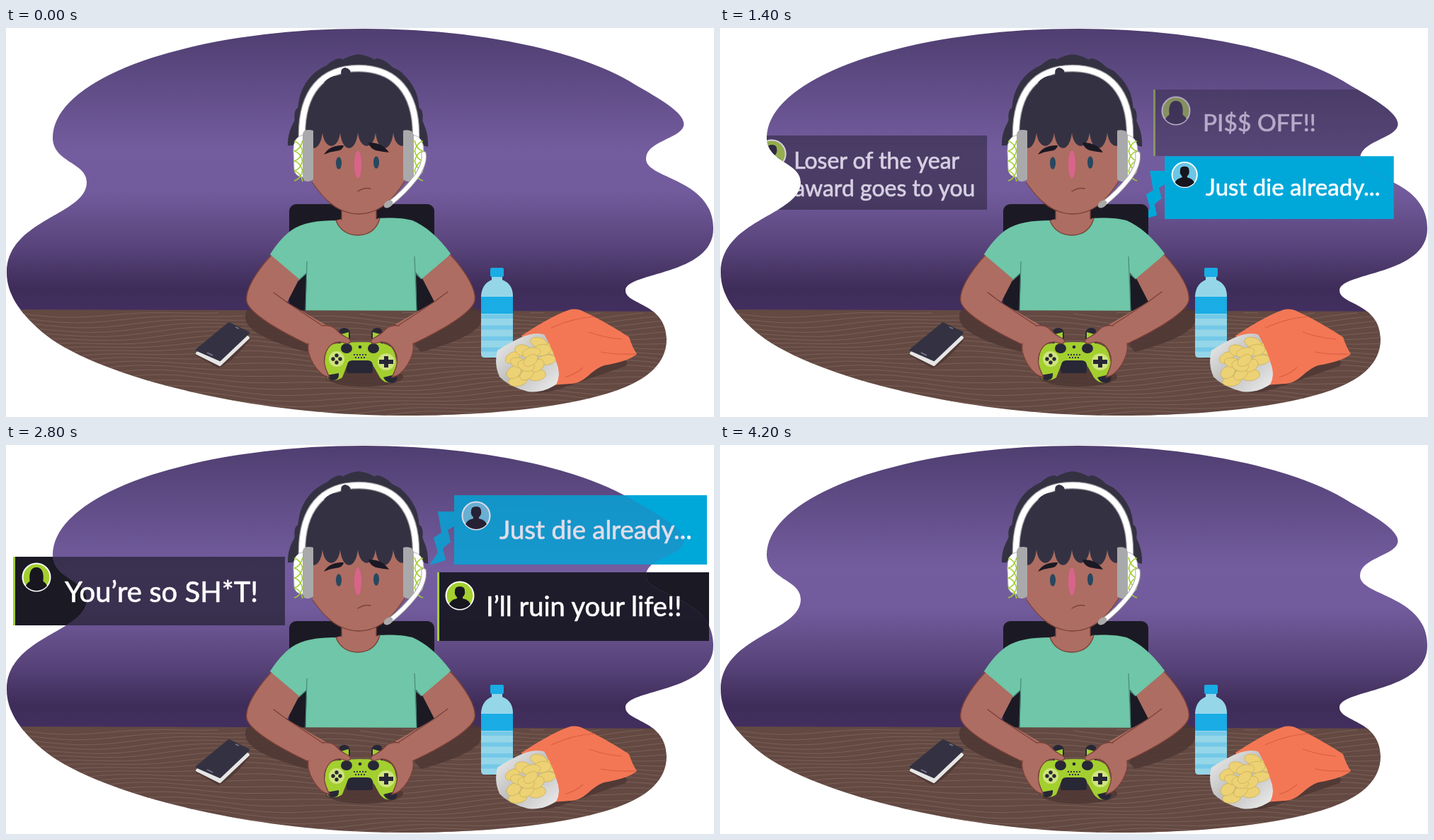
Recreate the animation shown at these times as an HTML page. Size 1000 by 550 pixels, loop 4300 ms.

```html
<!DOCTYPE html>
<html lang="en">
<head>
<meta charset="utf-8">
<title>Online bullying</title>
<style>
html, body { margin: 0; width: 100%; height: 100%; overflow: hidden; background: #fff; }
svg { display: block; width: 100%; height: 100%; }
text { font-family: Lato, "Open Sans", sans-serif; fill: #fff; stroke: #fff; stroke-width: .7; stroke-linejoin: round; }
.skin { fill: #ad6d62; }
.line { fill: none; stroke: #7b4038; stroke-width: 1.3; stroke-linecap: round; }
.hair { fill: #343242; }
.dark { fill: #282736; }
.lime { fill: #a3cf2f; }
.wire { fill: none; stroke-linecap: round; }
</style>
</head>
<body>
<svg viewBox="0 0 1000 550" xmlns="http://www.w3.org/2000/svg">
<defs>
  <linearGradient id="wallFill" gradientUnits="userSpaceOnUse" x1="0" y1="0" x2="0" y2="400">
    <stop offset="0" stop-color="#4f3e70"/><stop offset=".2" stop-color="#604c86"/>
    <stop offset=".44" stop-color="#745d9f"/><stop offset=".58" stop-color="#725b9c"/>
    <stop offset=".78" stop-color="#574379"/><stop offset=".92" stop-color="#3e2c59"/>
    <stop offset="1" stop-color="#422f5f"/>
  </linearGradient>
  <linearGradient id="foil" x1="0" y1="0" x2="1" y2="1">
    <stop offset="0" stop-color="#f2f2f2"/><stop offset=".5" stop-color="#bdbdbd"/><stop offset="1" stop-color="#f0f0f0"/>
  </linearGradient>
  <clipPath id="inBlob"><path d="M66 155A439 154 0 0 1 890 81C925 101 962 122 957 139C951 157 904 160 904 185C904 214 999 212 999 284C999 350 875 345 875 371C875 392 932 388 933 440C933 500 850 521 770 534C700 545 620 548 560 548C340 548 120 490 50 429C18 401 1 375 1 346C1 270 114 265 114 218C114 190 66 190 66 155Z"/></clipPath>
  <clipPath id="aboveDesk"><rect width="1000" height="400"/></clipPath>
  <path id="shade" d="M340 400C331 419 350 438 425 458L440 440L352 394Z"/>
  <g id="arm">
    <path class="skin" d="M374 321C353 345 337 371 340 387C344 403 383 427 428 448L452 420L397 388L414 355Z"/>
    <path class="line" d="M374 322C353 345 337 371 340 387C344 403 383 427 428 448M378 374L397 388L447 421"/>
  </g>
  <g id="hand">
    <path class="skin" d="M427 446C424 464 440 491 457 494C452 483 447 474 451 461C455 449 464 441 477 445C485 448 489 444 485 440C479 436 473 434 468 428C460 419 448 418 436 428Z"/>
    <path class="line" d="M427 446C424 464 440 491 457 494C452 483 447 474 451 461C455 449 464 441 477 445C485 448 489 444 485 440C479 436 473 434 468 428C462 421 455 420 447 421"/>
  </g>
  <g id="trigger">
    <path class="dark" d="M470 447V431Q471 423 479 424Q486 425 486 433V447Z"/>
    <path class="lime" d="M473 447V433L484 430V447Z"/>
  </g>
  <path id="band" d="M418 154C417 90 447 57 498 57C549 57 580 90 579 154"/>
  <path id="boom" d="M590 178Q592 192 579 211Q562 233 541 249"/>
</defs>

<g id="under" clip-path="url(#aboveDesk)"></g>
<g clip-path="url(#inBlob)">
  <rect width="1000" height="404" fill="url(#wallFill)"/>
  <g id="over"></g>
  <rect x="400" y="249" width="205" height="165" rx="10" fill="#1b1a24"/>

  <path fill="#6fc6a8" d="M467 272C440 272 419 275 403 286C391 295 381 307 373 320Q390 343 413 357L425 346L423 402H580L579 346L587 355Q610 343 628 319C612 297 593 280 574 272C560 268 540 268 526 269Q514 293 497 293Q478 293 467 272Z"/>
  <path d="M425 330L423 400M577 323L580 400M425 346L413 357M578 347L587 355" fill="none" stroke="#468b78" stroke-width="1.2"/>
  <path class="skin" d="M474 250V270L466 272C471 286 483 293 497 293C513 293 524 284 528 269L523 270V250Z"/>
  <path class="line" d="M466 272C471 286 483 293 497 293C513 293 524 284 528 269M474 259V271M523 259V270"/>

  <path d="M0 398L1000 401V550H0Z" fill="#634942"/>
  <path id="grain" fill="none" stroke="#7c6259" stroke-width=".9"/>
  <g fill="#4e3733" opacity=".85">
    <use href="#shade"/><use href="#shade" transform="translate(1011 0)scale(-1 1)"/>
    <ellipse cx="506" cy="493" rx="55" ry="14"/>
    <path d="M268 463L300 481Q320 472 345 440L335 430Z"/>
    <path d="M668 461Q690 474 720 462L700 495Q735 525 780 511L875 478Q884 468 850 460Z"/>
  </g>

  <g stroke-linejoin="round" stroke-width="4">
    <path d="M270 460L302 476L342 438L315 422Z" fill="#e6e6e6" stroke="#e6e6e6"/>
    <path d="M270 455L302 469L342 431L315 418Z" fill="#343242" stroke="#343242"/>
    <path d="M284 459L292 463M324 423L329 425" stroke="#77758a" stroke-width="1.7"/>
  </g>

  <use href="#arm"/><use href="#arm" transform="translate(1002 -1)scale(-1 1)"/>

  <use href="#trigger"/><use href="#trigger" transform="translate(1002 0)scale(-1 1)"/>
  <rect class="dark" x="481" y="466" width="37" height="22" rx="3"/>
  <path class="lime" d="M470 446Q500 442 532 446Q545 448 549 460C553 475 557 493 549 500Q536 505 528 494L518 476Q517 470 511 470H489Q483 470 482 476L475 494Q467 500 456 497C446 490 450 458 456 450Q462 446 470 446Z"/>
  <path class="dark" d="M453 491L470 488Q471 498 462 498Q455 499 453 491ZM533 494L553 489Q554 501 545 502Q537 502 533 494Z"/>
  <g fill="#cfe47f"><circle cx="467" cy="468" r="11"/><circle cx="537" cy="472" r="12"/></g>
  <g id="buttons" class="dark">
    <path d="M534 464H540V469H547V475H540V480H534V475H527V469H534Z"/>
    <ellipse cx="481" cy="453" rx="8" ry="7"/><ellipse cx="519" cy="453" rx="8" ry="7"/><circle cx="500" cy="451" r="2.3"/>
  </g>
  <path d="M491 462H510M493 466H509" stroke="#343242" stroke-width="2" stroke-dasharray="2 2"/>
  <use href="#hand"/><use href="#hand" transform="translate(1002 0)scale(-1 1)"/>

  <g id="tufts" class="hair"></g>
  <path class="hair" d="M398 166C398 142 407 136 412 120C413 70 446 44 498 45C552 45 584 75 584 120C591 140 597 146 596 168Q580 165 570 150H425Q412 168 398 166Z"/>
  <path class="skin" d="M433 140H563V217C549 239 530 263 497 263C466 262 447 239 433 219Z"/>
  <path class="line" d="M433 219C447 239 466 262 497 263C530 263 549 239 563 217"/>
  <path id="fringe" class="hair"/>
  <path d="M449 179C456 168 465 166 477 166Q476 173 466 174Q457 175 449 179ZM541 176C533 164 522 162 512 162Q514 170 522 173Q531 175 541 176Z" fill="#1b1924"/>
  <g fill="#27485f"><ellipse cx="470" cy="191" rx="4" ry="8.7"/><ellipse cx="523" cy="190" rx="4" ry="8.7"/></g>
  <ellipse cx="497" cy="193" rx="5" ry="19.5" fill="#d9648b"/>
  <path class="line" d="M497 231Q506 225 515 227"/>
  <use href="#band" class="wire" stroke="#a5a5a8" stroke-width="10.5"/>
  <use href="#band" class="wire" stroke="#fff" stroke-width="8"/>
  <path class="hair" d="M449 77Q459 65 474 68Q471 57 479 56Q488 57 487 68Q478 69 473 80Q459 86 449 77Z"/>
  <g fill="#fff" stroke="#b4b4b6">
    <path d="M420 151Q405 154 406 174L407 200Q408 210 420 211Z"/>
    <path d="M575 151Q590 154 590 174L589 200Q588 210 575 211Z"/>
  </g>
  <path id="mesh" fill="none" stroke="#a3cf2f" stroke-width="1.6"/>
  <path d="M422 145Q427 143 434 145V214Q429 219 421 216Q419 212 419 207V152Q419 147 422 145ZM561 145Q568 143 573 146Q576 149 576 154V207Q576 215 573 216Q566 219 561 214Z" fill="#a9a9ab"/>
  <use href="#boom" class="wire" stroke="#a5a5a8" stroke-width="7.5"/>
  <use href="#boom" class="wire" stroke="#fff" stroke-width="5.5"/>
  <ellipse cx="540" cy="249" rx="7" ry="4.5" transform="rotate(-35 540 249)" fill="#aaa"/>

  <g id="bottle">
    <path d="M686 350H701V356Q716 362 716 379V461Q716 466 711 466H676Q671 466 671 461V379Q672 362 686 356Z" fill="#95d6e9"/>
    <rect x="684" y="339" width="19" height="13" rx="2" fill="#19ace5"/>
    <path d="M671 380H716V404H671Z" fill="#19ace5"/>
  </g>

  <path d="M728 435C750 421 770 408 794 399Q806 395 818 402C840 412 863 426 880 437Q884 450 891 461Q880 471 845 477Q835 480 822 492Q808 504 797 503L770 505Z" fill="#f37755"/>
  <path d="M770 424Q800 410 832 408M823 430Q845 438 870 440M785 495Q803 491 815 480M840 458Q862 462 889 461" fill="none" stroke="#d85f43" stroke-width="1.2"/>
  <path d="M694 456Q714 443 731 436Q750 429 762 434Q772 455 780 480Q783 495 777 504Q757 517 737 514Q710 507 697 493Q689 475 694 456Z" fill="url(#foil)"/>
  <g id="chips" fill="#ecd274" stroke="#cfb35a" stroke-width=".8"></g>
  <path d="M760 433Q773 455 780 480Q783 495 777 504L790 502V440Z" fill="#f37755"/>
</g>
</svg>
<script>
const LOOP = 4300, STEP = 100;
const NS = "http://www.w3.org/2000/svg";
const byId = id => document.getElementById(id);

function add(parent, tag, attrs, content) {
  const el = document.createElementNS(NS, tag);
  for (const k in attrs) el.setAttribute(k, attrs[k]);
  if (content) el.textContent = content;
  return parent.appendChild(el);
}

const ellipse = (parent, cx, cy, rx, ry, turn = 0) =>
  add(parent, "ellipse", { cx, cy, rx, ry, transform: `rotate(${turn} ${cx} ${cy})` });

// Locks follow the crown, each lifted a little off its tangent
for (let deg = 0; deg <= 180; deg += 20) {
  const a = deg * Math.PI / 180, lift = deg < 90 ? -16 : 16;
  ellipse(byId("tufts"), 498 - 79 * Math.cos(a), 136 - 86 * Math.sin(a), 24, 10, deg - 90 + lift);
}

let teeth = "M422 110V148";
for (let i = 0; i < 6; i++) teeth += `c3 ${i % 2 ? 25 : 29} 22 ${i % 2 ? 25 : 29} 25 0`;
byId("fringe").setAttribute("d", teeth + "V110Z");

let mesh = "";
for (const [x, dir] of [[407, 1], [589, -1]])
  for (let y = 160; y < 210; y += 14)
    mesh += `M${x} ${y}q${9 * dir} 2 ${12 * dir} 15M${x} ${y + 14}q${9 * dir} -2 ${12 * dir} -15`;
byId("mesh").setAttribute("d", mesh);

for (let i = 0; i < 4; i++) {
  const a = i * Math.PI / 2;
  ellipse(byId("buttons"), 467 + 5 * Math.cos(a), 468 + 5 * Math.sin(a), 2.7, 2.7);
  add(byId("bottle"), "rect", { x: 671, y: 405 + i * 15.5, width: 45, height: 6, fill: "#74c9e8" });
}

// Chips spiral out across the slanted opening
for (let i = 14; i >= 0; i--) {
  const r = Math.sqrt(i / 14), a = i * 2.4, dx = 32 * r * Math.cos(a);
  ellipse(byId("chips"), 741 + dx, 470 - .35 * dx + 28 * r * Math.sin(a), 11 + i % 3, 7 + i % 2, i * 47 % 70 - 35);
}

// Wood grain: flowing lines that bend together
let grain = "";
for (let i = 0; i < 25; i++) {
  for (let x = 0; x <= 1000; x += 20) {
    const y = 394 + i * 7 + 6 * Math.sin(x / 95 + i * .17) + 3 * Math.sin(x / 37 - i * .5);
    grain += y < 402 ? `M${x + 20} 403` : (x ? "L" : "M") + x + " " + y.toFixed(1);
  }
}
byId("grain").setAttribute("d", grain);

// Offsets from the resting place on entry and drift per 100 ms on exit
const left = { dx: 98, dy: 203, scale: .7, drift: [-4.4, -21], ease: f => f };
const right = { dx: -8, dy: 259, scale: .74, drift: [2, -17], ease: f => 1 - (1 - f) ** 2 };

const bubbles = [
  { side: right, x: 606, y: 138, w: 371, h: 94, enter: [100, 600], exit: [1100, 1700],
    face: [32, 30], long: true, size: 33.5, text: [70, 59], lines: ["PI$$ OFF!!"], solid: .63 },
  { side: left, x: 52, y: 194, w: 334, h: 105, enter: [300, 700], exit: [1200, 1900],
    face: [30, 26], size: 32, text: [61, 47], lines: ["Loser of the year", "award goes to you"], solid: .63 },
  { side: right, x: 631, y: 88, w: 357, h: 98, enter: [1200, 1700], exit: [2700, 3200],
    face: [31, 29], size: 36.5, text: [64, 62], lines: ["Just die already..."], solid: 1, blue: true,
    bolt: "M0 23H-23L-18 53L-29 60L-23 81L-35 99L-12 92L-16 75L-5 66L-9 49L0 44Z" },
  { side: left, x: 10, y: 158, w: 384, h: 97, enter: [1500, 1900], exit: [2800, 3200],
    face: [33, 29], long: true, size: 40, text: [73, 64], lines: ["You’re so SH*T!"], solid: .63 },
  { side: right, x: 609, y: 180, w: 384, h: 97, enter: [2400, 2800], exit: [3500, 4100],
    face: [32, 33], size: 38, text: [69, 62], lines: ["I’ll ruin your life!!"], solid: .95 },
  { side: left, x: 6, y: 24, w: 354, h: 98, enter: [2900, 3200], exit: [3600, 4200],
    face: [31, 30], long: true, size: 31.5, text: [67, 39], lines: ["How’d we get", "stuck with you??"], solid: 1, blue: true,
    bolt: "M354 68L360 98L385 102L378 119L392 126L388 148L399 164L376 149L375 134L356 131L362 115L338 112L330 98Z" }
];

function drawBubble(layer, b, opacity) {
  const g = add(layer, "g", {});
  const fill = b.blue ? "#00a8da" : "#1a1924";
  add(g, "rect", { width: b.w, height: b.h, fill, "fill-opacity": opacity });
  if (b.bolt) add(g, "path", { d: b.bolt, fill });
  else add(g, "rect", { width: 3, height: b.h, fill: "#a3cf2f" });
  const a = add(g, "g", { transform: `translate(${b.face})`, fill: "#17161f" });
  add(a, "circle", { r: 19.5, fill: b.blue ? "#6cc7e4" : "#a3cf2f", stroke: "#fff", "stroke-width": 2 });
  add(a, "path", { d: "M-15 12Q-13 6 -4 4H4Q13 6 15 12Q9 19 0 19Q-9 19 -15 12Z" });
  add(a, "path", { d: b.long ? "M-9 8C-11 -4 -9 -14 0 -14C9 -14 11 -4 9 8Z"
                             : "M-4 7V2Q-8 -1 -7 -7Q-7 -13 0 -13Q7 -13 7 -7Q8 -1 4 2V7Z" });
  const [x, y] = b.text;
  b.lines.forEach((words, i) => add(g, "text", { x, y: y + i * 39, "font-size": b.size }, words));
  return g;
}

for (const b of bubbles) {
  b.under = drawBubble(byId("under"), b, 1);
  b.over = drawBubble(byId("over"), b, b.solid);
}

const progress = (t, [from, to]) => Math.min(1, Math.max(0, (t - from) / (to - from)));

function place(b, t) {
  const { dx, dy, scale, drift, ease } = b.side;
  const away = 1 - ease(progress(t, b.enter));
  const gone = Math.max(0, t - b.exit[0]) / 100;
  const alpha = 1 - progress(t, b.exit);
  const shown = t >= b.enter[0] && alpha > 0;
  b.over.style.display = shown ? "" : "none";
  // Outside the scene a bubble is either solid or absent
  b.under.style.display = shown && alpha * b.solid > .58 ? "" : "none";
  const x = b.x + dx * away + drift[0] * gone, y = b.y + dy * away + drift[1] * gone;
  for (const el of [b.under, b.over])
    el.setAttribute("transform", `translate(${x} ${y}) scale(${1 - (1 - scale) * away})`);
  b.over.setAttribute("opacity", alpha);
}

function render(ms) {
  const t = Math.floor(ms % LOOP / STEP) * STEP;
  for (const b of bubbles) place(b, t);
}

const start = performance.now();
function tick() {
  render(performance.now() - start);
  requestAnimationFrame(tick);
}
tick();
</script>
</body>
</html>
```
